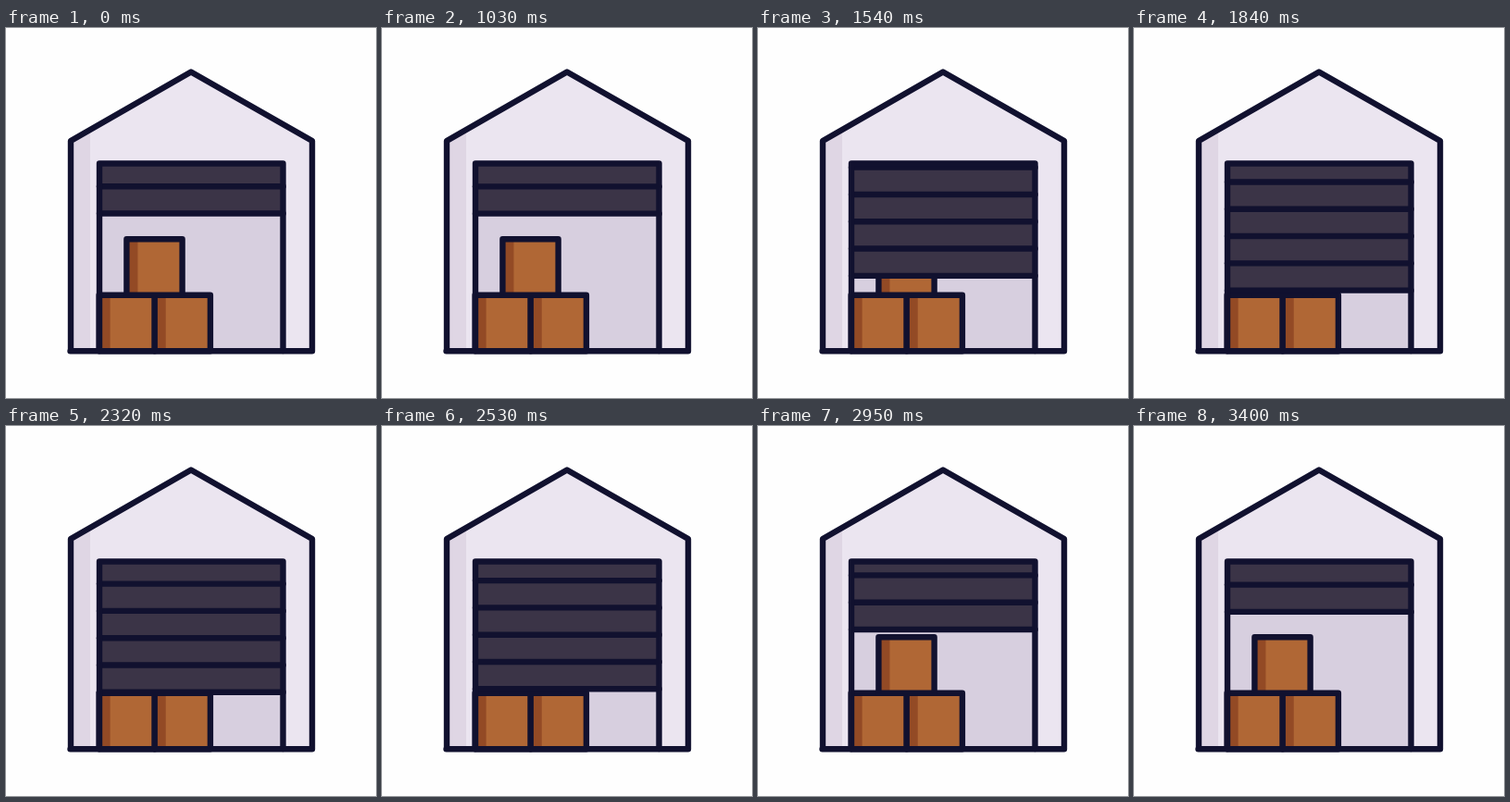
Animation, 400 px wide and 400 px high, one loop 3430 ms. Source, as an HTML page:

```html
<!DOCTYPE html>
<html lang="en">
<head>
<meta charset="utf-8">
<title>Warehouse door</title>
<style>
  html, body { margin: 0; width: 100%; height: 100%; overflow: hidden; background: #fefefe; }
  svg { display: block; width: 100vw; height: 100vh; }
  .ink { fill: none; stroke: #11112f; stroke-width: 6.4; stroke-linecap: round; stroke-linejoin: round; }
</style>
</head>
<body>
<svg viewBox="0 0 400 400">
  <defs>
    <g id="box">
      <path fill="#b06735" d="M0 0h60.2v60.5H0z"/>
      <path fill="#934a25" d="M0 0h12v60.5H0z"/>
      <path class="ink" d="M0 0h60.2v60.5H0z"/>
    </g>
  </defs>
  <path fill="#ebe5f0" d="M70 349V122L200 47.5L331 122V349z"/>
  <path fill="#dfd6e4" d="M70 349V122L91 110V349z"/>
  <path fill="#d7cfdf" d="M101 146.5H299.5V349H101z"/>
  <use href="#box" x="100.6" y="288.7"/>
  <use href="#box" x="160.7" y="288.7"/>
  <use href="#box" x="130.4" y="228.3"/>
  <rect id="door" x="101" y="146.5" width="198.5" fill="#3b3447"/>
  <g id="slats" class="ink"></g>
  <path class="ink" d="M101 349V146.5H299.5V349"/>
  <path class="ink" d="M70 349V122L200 47.5L331 122V349M69.5 349.2H331"/>
</svg>
<script>
const LOOP = 3430, TOP = 146.5, OPEN = 200.5, CLOSED = 287.8, GAP = 29.3;
const DOWN = { at: 996, dur: 1204, x2: 0.1 };
const UP = { at: 2397, dur: 1106, x2: 0.2 };
const HIDE_AT = 2905;

const door = document.getElementById('door');
const group = document.getElementById('slats');
const slats = Array.from({ length: 5 }, () => {
  const line = document.createElementNS('http://www.w3.org/2000/svg', 'path');
  line.setAttribute('d', 'M101 0H299.5');
  return group.appendChild(line);
});

// cubic-bezier(.4, 0, x2, 1), solved by bisection
function ease(x, x2) {
  if (x <= 0) return 0;
  if (x >= 1) return 1;
  let lo = 0, hi = 1, s = 0.5;
  for (let i = 0; i < 24; i++) {
    s = (lo + hi) / 2;
    const r = 1 - s;
    if (1.2 * s * r * r + 3 * x2 * s * s * r + s ** 3 < x) lo = s;
    else hi = s;
  }
  return s * s * (3 - 2 * s);
}

const progress = (t, m) => ease((t - m.at) / m.dur, m.x2);

function draw(t) {
  const shut = progress(t, DOWN) - progress(t, UP);
  const bottom = OPEN + (CLOSED - OPEN) * shut;
  door.setAttribute('height', bottom - TOP);
  slats.forEach((line, i) => {
    const y = bottom - i * GAP;
    // the top slat rides above the opening before it vanishes
    const overrun = i === 4 && t > UP.at && t < HIDE_AT;
    line.setAttribute('transform', `translate(0 ${y})`);
    line.setAttribute('visibility', y >= TOP || overrun ? 'visible' : 'hidden');
  });
}

const start = performance.now();
function tick() {
  draw((performance.now() - start) % LOOP);
  requestAnimationFrame(tick);
}
tick();
</script>
</body>
</html>
```
